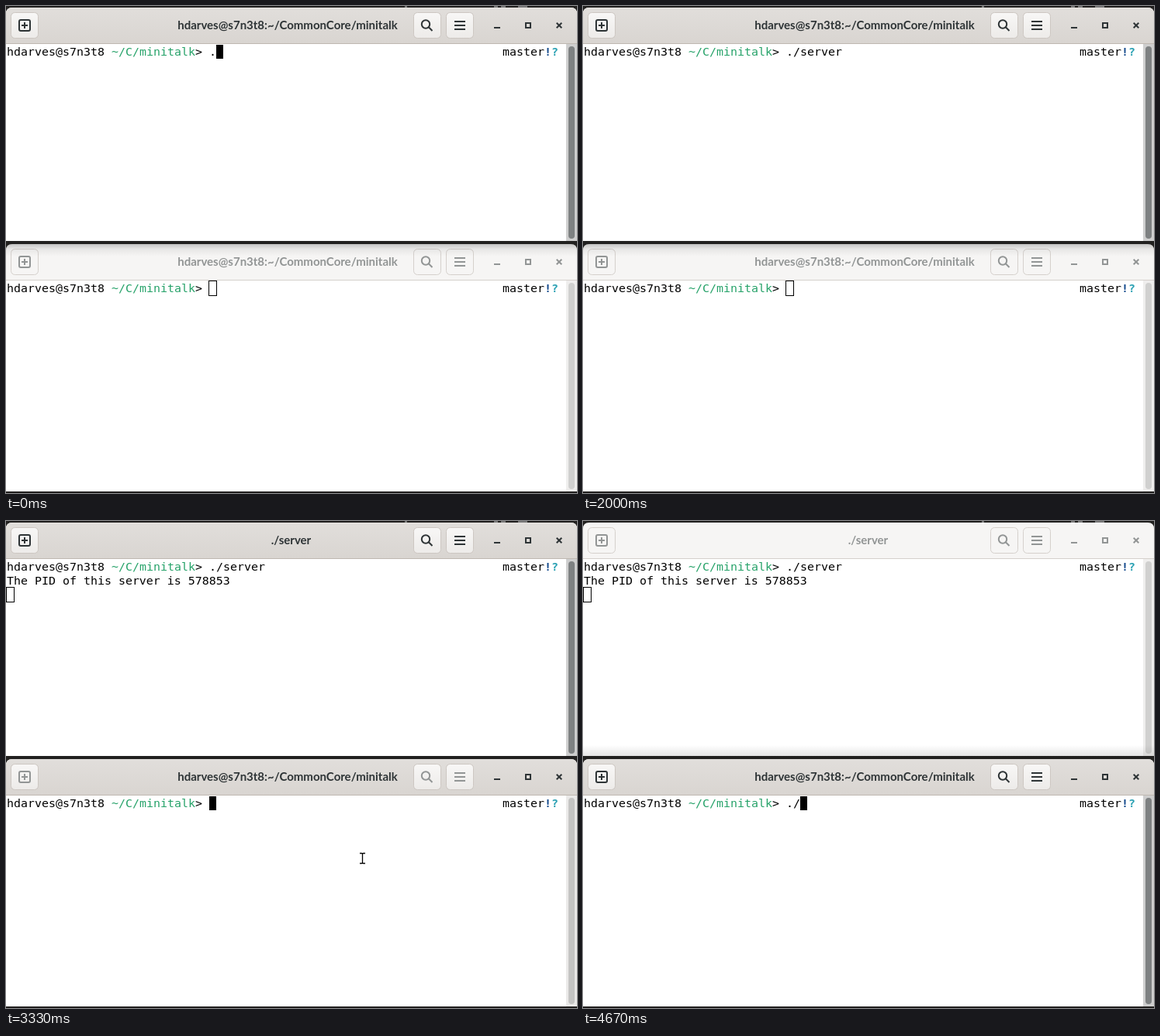
Write an HTML page that moves like this. It is 736x628 px and loops after 5000 ms.

```html
<!DOCTYPE html>
<html lang="en">
<head>
<meta charset="utf-8">
<title>Two terminals</title>
<style>
  html, body { margin: 0; width: 100%; height: 100%; overflow: hidden; background: #222120; }
  svg { display: block; width: 736px; height: 628px; }
  .mono { font: 14.95px "DejaVu Sans Mono", monospace; fill: #000; }
  .title { font: bold 15px Lato, "Noto Sans", sans-serif; text-anchor: middle; }
  .path { fill: #26a269; }
  .dirty { fill: #12488b; font-weight: bold; }
  .extra { fill: #2aa1b3; font-weight: bold; }
  .icon { fill: none; stroke-width: 2; }
</style>
</head>
<body>
<svg viewBox="0 0 736 628">
  <defs>
    <linearGradient id="header" x2="0" y2="1">
      <stop stop-color="#e1dedb"/><stop offset="1" stop-color="#d9d5d1"/>
    </linearGradient>
    <linearGradient id="button" x2="0" y2="1">
      <stop stop-color="#f8f7f6"/><stop offset="1" stop-color="#edebe9"/>
    </linearGradient>
    <linearGradient id="shadeDown" x2="0" y2="1">
      <stop stop-opacity=".2"/><stop offset=".4" stop-opacity=".06"/><stop offset="1" stop-opacity="0"/>
    </linearGradient>
    <linearGradient id="shadeUp" x2="0" y2="1">
      <stop stop-opacity="0"/><stop offset="1" stop-opacity=".1"/>
    </linearGradient>
  </defs>
  <rect width="736" height="628" fill="#222120"/>
  <path d="M514 1h3M629 1h5M638 1h6M660 1h12" stroke="#777" stroke-width="2"/>
  <g id="windows"></g>
  <g id="pointer" fill="none">
    <path id="beam" d="M-3.5-6.5h2.5q1 0 1 1q0-1 1-1h2.5M-3.5 6.5h2.5q1 0 1-1q0 1 1 1h2.5M0-6V6" stroke="#fff" stroke-width="3"/>
    <use href="#beam"/>
    <path d="M-3.5-6.5h2.5q1 0 1 1q0-1 1-1h2.5M-3.5 6.5h2.5q1 0 1-1q0 1 1 1h2.5M0-6V6" stroke="#000" stroke-width="1.3"/>
  </g>
</svg>
<script>
const LOOP = 5000, CELL = 9, ROW = 18;
const USER = "hdarves@s7n3t8";
const SHELL_TITLE = USER + ":~/CommonCore/minitalk";
const column = n => 1 + n * CELL;

// Each key: [time, typed text]
const serverKeys = [[0, "."], [830, "./"], [920, "./s"], [1080, "./se"], [1330, "./ser"], [1420, "./server "]];
const clientKeys = [[0, ""], [4170, "."], [4670, "./"]];

const clamp = x => Math.max(0, Math.min(1, x));
const ramp = (t, from, to) => clamp((t - from) / (to - from));
const latest = (keys, t) => keys.filter(k => k[0] <= t).pop()[1];

function mix(a, b, f) {
  const rgb = a.map((v, i) => Math.round(v + (b[i] - v) * f));
  return `rgb(${rgb})`;
}
const INK = [[146, 149, 149], [46, 52, 54]];
const EDGE = [[213, 208, 204], [191, 184, 177]];
const TROUGH = [[239, 238, 237], [206, 206, 206]];
const SLIDER = [[208, 208, 207], [126, 129, 130]];

const button = x => `
  <rect x="${x}" y="8.5" width="35" height="33" rx="5" fill="#f6f5f4" stroke="#d5d0cc"/>
  <rect data-part="lit" x="${x}" y="8.5" width="35" height="33" rx="5" fill="url(#button)" stroke="#cdc7c2"/>`;

function createWindow(top, bottom, shade) {
  const g = document.createElementNS("http://www.w3.org/2000/svg", "g");
  const height = bottom - top;
  const headerShape = "M0 48V10Q0 2 8 2H728Q736 2 736 10V48Z";
  g.setAttribute("transform", `translate(0 ${top - 2})`);
  g.innerHTML = `
    <rect y="48" width="736" height="${height - 46}" fill="#fff"/>
    <path d="${headerShape}" fill="#f6f5f4"/>
    <path data-part="header" d="${headerShape}" fill="url(#header)"/>
    <rect data-part="edge" y="48" width="736" height="1"/>
    ${button(6.5)}${button(525.5)}${button(567.5)}
    <g data-part="icons" class="icon">
      <rect x="17" y="18" width="14" height="14" rx="2"/>
      <path d="M24 21v8M20 25h8"/>
      <circle cx="541" cy="23.5" r="5.2"/>
      <path d="M544.8 27.3l4.7 4.7M578 20h14M578 25h14M578 30h14"/>
    </g>
    <g data-part="controls" class="icon">
      <path d="M629 28h8M709.7 21.7l6.6 6.6M716.3 21.7l-6.6 6.6"/>
      <rect x="670" y="22" width="6" height="6"/>
    </g>
    <text data-part="title" class="title" y="30"></text>
    <rect data-part="trough" x="722" y="49" width="14" height="${height - 47}"/>
    <rect data-part="slider" x="725" y="52" width="8" height="${height - 53}" rx="4"/>
    <g class="mono">
      <text x="1" y="64">${USER}</text>
      <text class="path" x="${column(15)}" y="64">~/C/minitalk</text>
      <text x="${column(27)}" y="64">&gt;</text>
      <text data-part="typed" x="${column(29)}" y="64"></text>
      <text x="${column(71)}" y="64">master<tspan class="dirty">!</tspan><tspan class="extra">?</tspan></text>
      <text data-part="output" x="1" y="82"></text>
    </g>
    <rect data-part="cursor"/>
    ${shade === "down"
      ? `<path data-part="shade" d="M0 18V10Q0 2 8 2H728Q736 2 736 10V18Z" fill="url(#shadeDown)"/>`
      : `<rect data-part="shade" y="${height - 12}" width="736" height="14" fill="url(#shadeUp)"/>`}`;
  document.getElementById("windows").append(g);
  const parts = { lit: [] };
  for (const el of g.querySelectorAll("[data-part]")) {
    const name = el.dataset.part;
    if (name === "lit") parts.lit.push(el);
    else parts[name] = el;
  }
  return parts;
}

function set(el, attributes) {
  for (const name in attributes) el.setAttribute(name, attributes[name]);
}

function drawCursor(el, { col, row, hollow, on }) {
  const x = column(col), y = 50 + row * ROW;
  set(el, hollow
    ? { x: x - .5, y: y - .5, width: 10, height: 19, fill: "none", stroke: "#000" }
    : { x, y, width: CELL, height: ROW, fill: "#000", stroke: "none" });
  el.setAttribute("visibility", on ? "visible" : "hidden");
}

function drawWindow(parts, s) {
  set(parts.header, { opacity: s.frame });
  set(parts.edge, { fill: mix(...EDGE, s.frame) });
  set(parts.title, { fill: mix(...INK, s.frame), x: s.title === SHELL_TITLE ? 363 : 367.5 });
  set(parts.controls, { stroke: mix(...INK, s.frame) });
  set(parts.icons, { stroke: mix(...INK, s.icons) });
  parts.lit.forEach(el => set(el, { opacity: s.frame }));
  set(parts.trough, { fill: mix(...TROUGH, s.bar) });
  set(parts.slider, { fill: mix(...SLIDER, s.bar) });
  set(parts.shade, { opacity: 1 - s.frame });
  parts.title.textContent = s.title;
  parts.typed.textContent = s.typed.trim();
  parts.output.textContent = s.output;
  drawCursor(parts.cursor, s.cursor);
}

const server = createWindow(2, 303, "up");
const client = createWindow(307, 626, "down");
const pointer = document.getElementById("pointer");
const between = (t, from, to) => t >= from && t < to;

function render(time) {
  const t = Math.floor((time + 4) * 12 / 1000) * 1000 / 12 + 4;
  const running = t >= 2170, switched = t >= 3330;

  const serverTyped = latest(serverKeys, t);
  const serverFade = 1 - ramp(t, 3337, 3504);
  drawWindow(server, {
    frame: serverFade, icons: serverFade,
    bar: t >= 3660 ? 0 : 1 - .9 * ramp(t, 3337, 3504),
    title: running ? "./server" : SHELL_TITLE,
    typed: serverTyped,
    output: running ? "The PID of this server is 578853" : "",
    cursor: {
      col: running ? 0 : 29 + serverTyped.length,
      row: running ? 2 : 0,
      hollow: switched,
      on: !(between(t, 580, 830) || between(t, 2000, 2170) || between(t, 2750, 3330))
    }
  });

  const clientTyped = latest(clientKeys, t);
  const clientFade = ramp(t, 3337, 3504);
  drawWindow(client, {
    frame: switched ? 1 : 0, icons: clientFade,
    bar: switched ? .15 + .85 * clientFade : 0,
    title: SHELL_TITLE, typed: clientTyped, output: "",
    cursor: {
      col: 29 + clientTyped.length, row: 0,
      hollow: !switched,
      on: !between(t, 3920, 4170)
    }
  });

  const left = (1 - ramp(t, 3000, 3250)) ** 2;
  const y = t >= 3330 ? 435 : 434 - 54 * left;
  set(pointer, {
    transform: `translate(${459.5 + 12 * left} ${y})`,
    visibility: between(t, 3000, 4170) ? "visible" : "hidden"
  });
}

const start = performance.now();
function tick() {
  render((performance.now() - start) % LOOP);
  requestAnimationFrame(tick);
}
tick();
</script>
</body>
</html>
```
